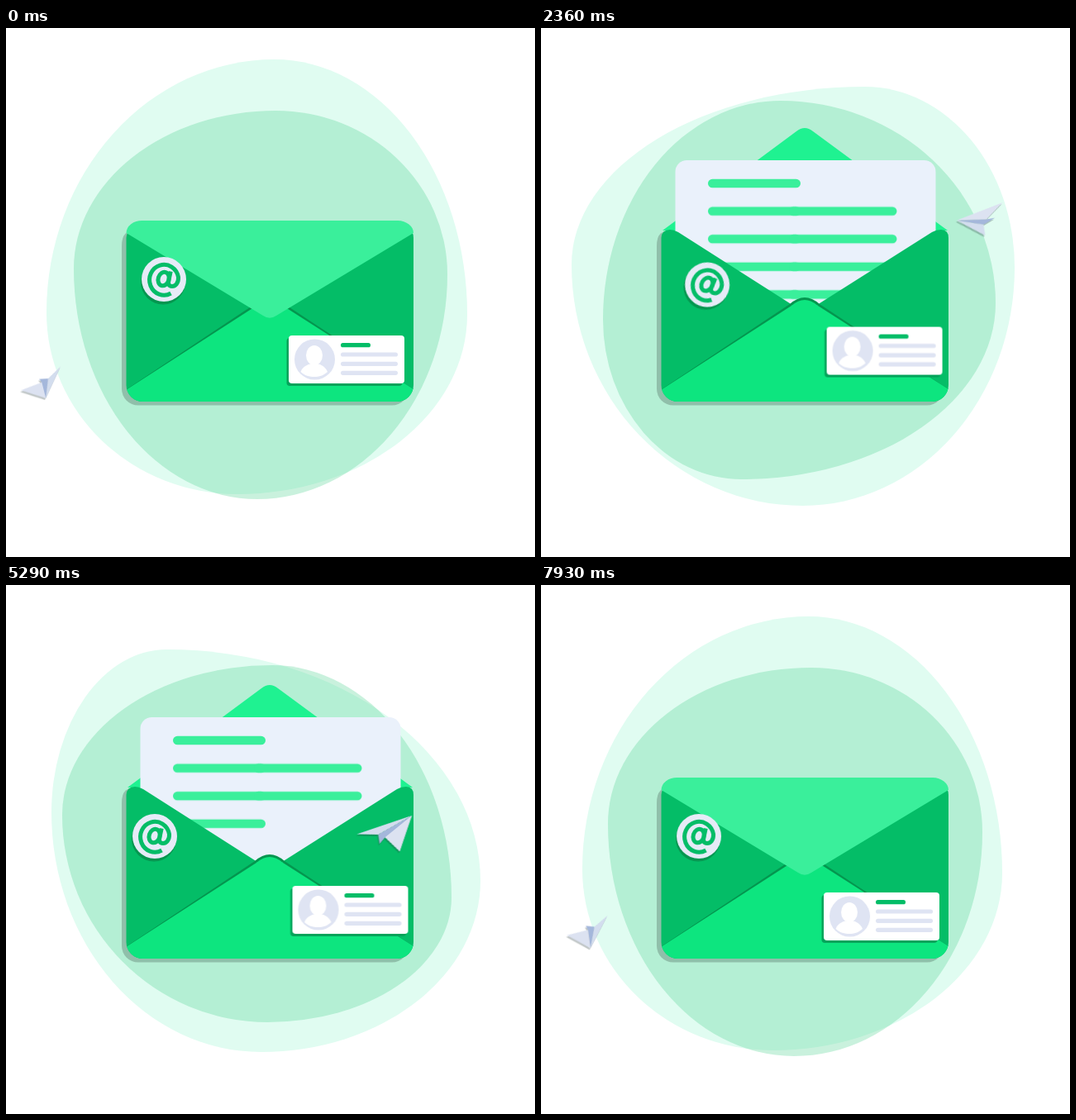
Animation of 640 by 640 pixels, one loop 8000 ms. Source, as an HTML page without scripts:

```html
<!DOCTYPE html>
<html lang="en">
<head>
<meta charset="utf-8">
<title>Envelope</title>
<style>
@property --a { syntax: "<angle>"; inherits: true; initial-value: 0deg; }
@keyframes clock { to { --a: 360deg; } }

html, body { margin: 0; width: 100%; height: 100%; overflow: hidden; background: #fff; }
body { position: relative; animation: clock 8s linear infinite; }
svg { position: absolute; inset: 0; width: 100%; height: 100%; }

/* Blobs: each side (l t r b) and the point where it touches (tx ry bx ly) swings with the clock. */
.blob {
  position: absolute;
  left: var(--l); top: var(--t);
  width: calc(var(--r) - var(--l)); height: calc(var(--b) - var(--t));
  border-radius:
    calc(var(--tx) - var(--l)) calc(var(--r) - var(--tx)) calc(var(--r) - var(--bx)) calc(var(--bx) - var(--l)) /
    calc(var(--ly) - var(--t)) calc(var(--ry) - var(--t)) calc(var(--b) - var(--ry)) calc(var(--b) - var(--ly));
}
.outer {
  background: #e0fcf1;
  --l: calc(47.5px - 10.5px * sin(var(--a) - 10deg));
  --t: calc(64px - 26px * cos(var(--a)));
  --r: calc(569px - 11px * cos(var(--a) + 5deg));
  --b: calc(569px + 9.5px * sin(var(--a) - 35deg));
  --tx: calc(303px + 85px * sin(var(--a) + 15deg) - 30px * sin(2 * var(--a)));
  --ry: calc(332px - 42px * sin(var(--a) - 20deg));
  --bx: calc(300px - 20px * cos(2 * var(--a)));
  --ly: calc(299px + 45px * cos(var(--a)));
}
.inner {
  background: rgb(77 209 144 / .3);
  --l: calc(74px + 8px * cos(var(--a) - 20deg));
  --t: calc(95px - 8px * sin(var(--a) - 40deg));
  --r: calc(541px + 10px * sin(var(--a) - 45deg));
  --b: calc(547px + 24px * cos(var(--a) - 15deg));
  --tx: calc(314px - 15px * sin(var(--a)) + 12px * cos(2 * var(--a)));
  --ry: calc(340px - 46px * cos(var(--a) - 25deg));
  --bx: calc(288px - 46px * sin(var(--a) - 20deg));
  --ly: calc(307px + 46px * sin(var(--a) - 20deg));
}

/* The flap folds about its hinge: the front half flattens, then the back half rises. */
.front, .back { transform-origin: 0 245px; animation: 4s infinite; }
.front { fill: #3aef9b; animation-name: front; }
.back { fill: #1ff291; animation-name: back; }
@keyframes front {
  0%, 5%, 92%, 100% { transform: none; animation-timing-function: cubic-bezier(.33, 0, .67, .33); }
  10.25%, 86.75% { transform: scaleY(0); animation-timing-function: cubic-bezier(.33, .67, .67, 1); }
}
@keyframes back {
  0%, 10.25%, 86.75%, 100% { transform: scaleY(0); animation-timing-function: cubic-bezier(.33, .67, .67, 1); }
  16%, 81% { transform: none; animation-timing-function: cubic-bezier(.33, 0, .67, .33); }
}

/* Letter, written line by line in two halves */
.letter { animation: slide 4s cubic-bezier(.45, 0, .5, 1) infinite; }
@keyframes slide {
  0%, 15%, 81%, 100% { transform: translateY(77px); }
  23.5%, 72.5% { transform: none; }
}
.line { transform: translateY(calc(var(--n) * 33.6px)); }
.line rect {
  y: 182.7px; height: 10.6px; rx: 5.3px; fill: #3aef9b; opacity: 0;
  animation: ink 4s step-end calc(850ms + var(--n) * 140ms + var(--half, 0) * 70ms) infinite;
}
.line rect:first-child { x: 202px; width: 112px; }
.line rect + rect { --half: 1; x: 300px; width: 130.5px; }
@keyframes ink { 0% { opacity: 1; } 67.5%, 100% { opacity: 0; } }

/* Stickers */
.badge, .card { animation: badge 8s ease-in-out infinite; }
.card { animation-name: card; }
@keyframes badge {
  0%, 100% { transform: translate(191px, 304px); }
  17.9% { transform: translate(204px, 310px) rotate(6deg); }
  39.3% { transform: translate(199px, 311px) rotate(14deg); }
  56.3% { transform: translate(183px, 300px); }
  66.1% { transform: translate(180px, 304px); }
  80.4% { transform: translate(208px, 297px) rotate(8deg); }
}
@keyframes card {
  0%, 100% { transform: translate(342px, 372px); }
  17.9% { transform: translate(345px, 365px); }
  39.3% { transform: translate(346px, 359px); }
  56.3% { transform: translate(339.5px, 367px); }
  66.1% { transform: translate(346.5px, 364px); }
  80.4% { transform: translate(343.5px, 360px); }
}

/* Paper plane: nose at 0,0; one full turn per loop, foreshortened where it turns */
.shade { filter: drop-shadow(-1px 2px 0 rgb(40 60 60 / .3)); }
.plane { animation: fly 4s linear infinite; }
@keyframes fly {
  0% { transform: translate(48px, 448px) rotate(76deg) skewX(17deg) scale(.33, 1.07); }
  12.5% { transform: translate(170px, 416px) rotate(-3deg) skewX(-46deg) scale(.93, .87); }
  32.25% { transform: translate(491px, 279px) rotate(-39deg) skewX(29deg) scale(.7, .98); }
  47% { transform: translate(578px, 196px) rotate(-78deg) skewX(20deg) scale(.33, 1); }
  60.75% { transform: translate(492px, 238px) rotate(-197deg) skewX(-37deg) scale(.64, .75); }
  78.5% { transform: translate(195px, 342px) rotate(-206deg) skewX(32deg) scale(.87, .67); }
  100% { transform: translate(48px, 448px) rotate(-284deg) skewX(17deg) scale(.33, 1.07); }
}
</style>
</head>
<body>
<div class="blob outer"></div>
<div class="blob inner"></div>
<svg viewBox="0 0 640 640">
  <defs>
    <path id="body" d="M145.500 254Q146 244 156 244Q161 244 166 247L304 335H334L473 247Q478 244 484 244Q493 244 493 254V432A20 20 0 0 1 473 452H165.500A20 20 0 0 1 145.500 432Z"/>
    <clipPath id="clip"><use href="#body"/></clipPath>
  </defs>

  <path d="M140 264Q140 246 152 246H487V436.500A20 20 0 0 1 467 456.500H160A20 20 0 0 1 140 436.500Z" opacity=".2"/>
  <path class="back" d="M147 245L309 125Q319 117 329 125L492 245Z"/>

  <g class="letter">
    <rect x="162.500" y="160" width="315" height="200" rx="14" fill="#eaf1fb"/>
    <g class="line" style="--n:0"><rect/></g>
    <g class="line" style="--n:1"><rect/><rect/></g>
    <g class="line" style="--n:2"><rect/><rect/></g>
    <g class="line" style="--n:3"><rect/><rect/></g>
    <g class="line" style="--n:4"><rect/><rect/></g>
  </g>

  <use href="#body" fill="#04bd67"/>
  <path d="M146 437L301 334Q319 318 337 334L493 437Z" fill="#04964f"/>
  <g clip-path="url(#clip)">
    <path d="M145 438L303 336Q319 322 335 336L493 437V452H145Z" fill="#0de57f"/>
  </g>
  <path d="M303 336Q319 322 335 336Z" fill="#0de57f"/>
  <path class="front" d="M145.500 248A19 15 0 0 1 165 233H474A19 15 0 0 1 493 248L327 348Q319 353.500 311 348Z"/>

  <g class="badge">
    <circle cx="-1" cy="3.500" r="27" fill="#04964f"/>
    <circle r="27" fill="#e6ebf7"/>
    <g fill="none" stroke="#04bd67" stroke-width="5">
      <path d="M8.500 17A17.600 18.400 0 1 1 17.500 -2.500C18 5 13.500 8.500 10 8.500C5.500 8.500 5 5 6 1L8.200 -9.500"/>
      <ellipse cx="-.5" cy="-.3" rx="6.400" ry="8.400" transform="rotate(18)"/>
    </g>
  </g>

  <g class="card">
    <rect x="-2.500" y="3" width="140" height="58" rx="4" fill="#04a35a"/>
    <rect width="140" height="58" rx="4" fill="#fff"/>
    <circle cx="31.500" cy="29" r="24.500" fill="#dfe4f3"/>
    <ellipse cx="31" cy="24" rx="10" ry="12" fill="#fff"/>
    <path d="M14.500 44C17 37 24 34 31 34S44 37 47 44C42 48.500 37 50 31 50S19 48.500 14.500 44Z" fill="#fff"/>
    <g fill="none" stroke="#dfe4f3" stroke-width="5.200" stroke-linecap="round">
      <path d="M65.600 11.700H96.400" stroke="#04bd67"/>
      <path d="M65.600 23H129.400M65.600 34.300H129.400M65.600 45.300H129.400"/>
    </g>
  </g>

  <g class="shade">
    <g class="plane">
      <path d="M0 0L-60 -8L-76 2L-60 0Z" fill="#a4b7db"/>
      <path d="M0 0L-75 -25L-60 -8Z" fill="#d3ddee"/>
      <path d="M0 0L-75 25L-60 0Z" fill="#dce2f1"/>
    </g>
  </g>
</svg>
</body>
</html>
```
